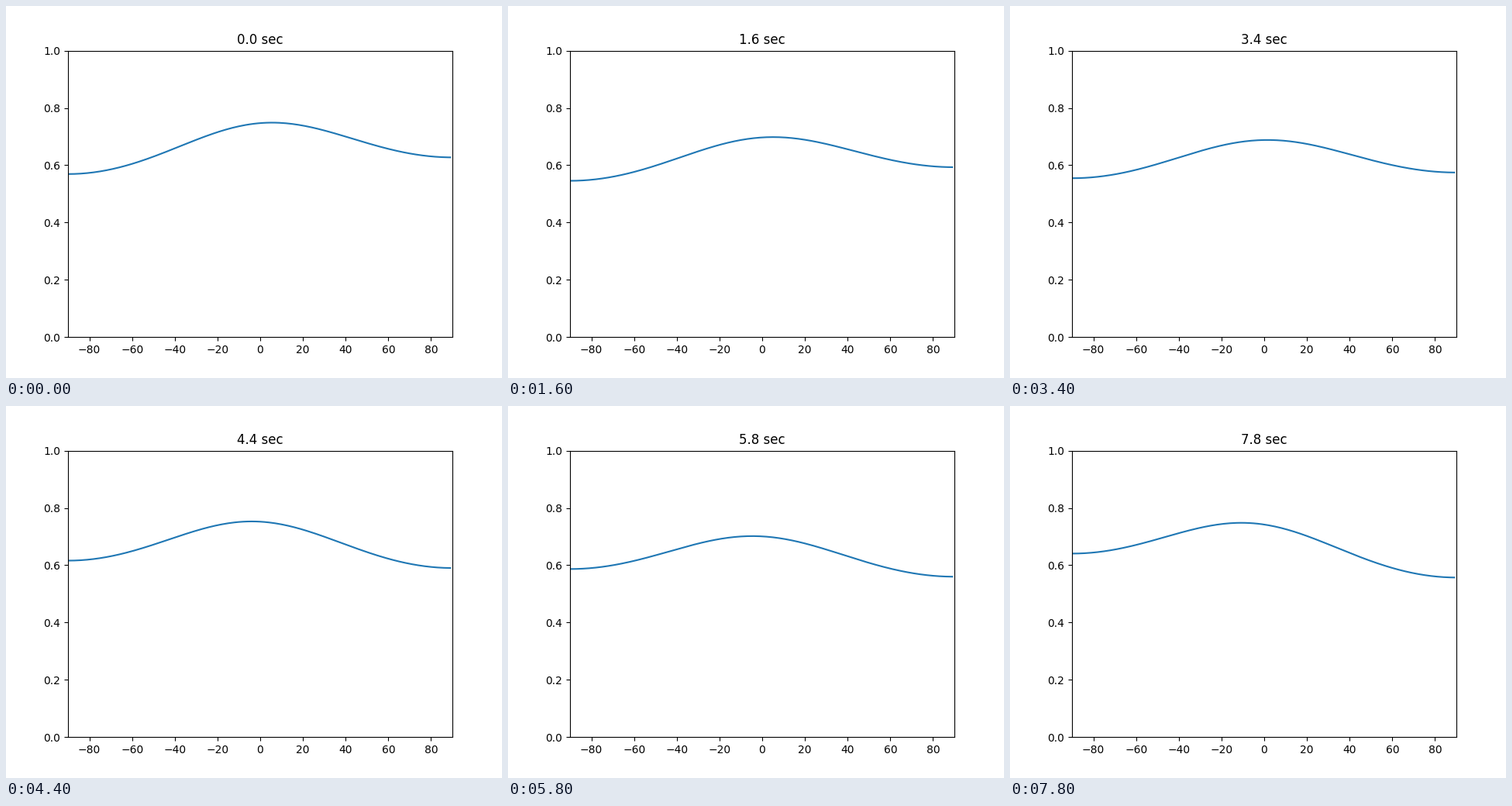
Write a matplotlib script that moves like this. It is 640 by 480 pixels and loops after 8 s.

```python
import numpy as np
import matplotlib.pyplot as plt
from matplotlib.animation import FuncAnimation

FRAMES = 40
STEP_MS = 200

# the centre level rises and falls between these turning points (seconds)
TURNS = [0, 1, 2.4, 3.6, 4.4, 6.2, 6.8, 7.8]
LEVELS = [0.747, 0.655, 0.753, 0.675, 0.752, 0.686, 0.770, 0.742]

angles = np.arange(-90, 90)
s = np.sin(np.radians(angles))


def lobe(left, mid, right):
    """Smooth peak over the sine of the angle through three levels."""
    left, mid, right = (v ** -0.5 for v in (left, mid, right))
    slope = (right - left) / 2
    bend = (right + left) / 2 - mid
    skew = 0.005 * s * (1 - s ** 2)
    return (mid + slope * s + bend * s ** 2 + skew) ** -2


def response(t):
    # the left side gains and the right side fades as the peak drifts left
    mid = np.interp(t, TURNS, LEVELS)
    left = mid * (0.762 + 0.013 * t)
    right = mid * (0.838 - 0.0118 * t + 0.6 * (0.75 - mid))
    return lobe(left, mid, right)


fig, ax = plt.subplots(figsize=(6.4, 4.8), dpi=100)
line, = ax.plot(angles, response(0))
ax.set_xlim(-90, 90)
ax.set_ylim(0, 1)
title = ax.set_title("0.0 sec")


def update(i):
    t = i * STEP_MS / 1000
    line.set_ydata(response(t))
    title.set_text(f"{t:.1f} sec")
    return line, title


anim = FuncAnimation(fig, update, frames=FRAMES, interval=STEP_MS,
                     repeat=True, repeat_delay=0, blit=False)
plt.show()
```
